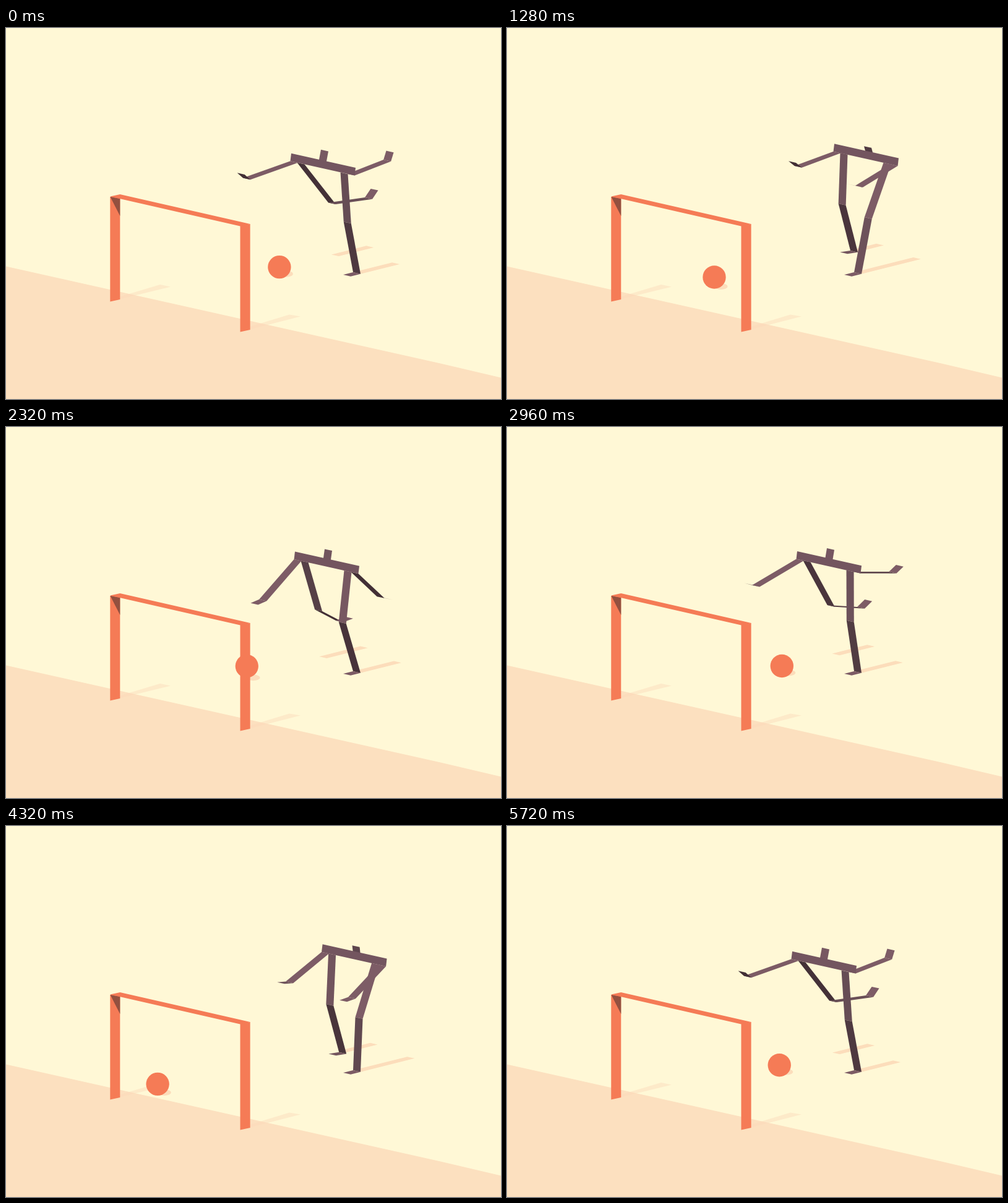
An HTML page with a canvas for the animation above (5.76 s loop, 800 by 600 pixels).

```html
<!DOCTYPE html>
<html lang="en">
<head>
<meta charset="utf-8">
<title>Off the bar</title>
<style>
html, body { margin: 0; width: 100%; height: 100%; overflow: hidden; background: #fff8d6; }
canvas { display: block; }
</style>
</head>
<body>
<canvas id="stage" width="800" height="600"></canvas>
<script>
const g = document.getElementById('stage').getContext('2d');
const CYCLE = 2880, STEP = 40, SLOPE = 0.224;
const SAND = '#fce0bf', ORANGE = '#f57b56', SHADE = '#fcddbb';
const LIGHT = [125, 92, 102], MID = [101, 76, 84], DARK = [66, 47, 53];

// Pose: torso x, head lift, left arm, right arm, left thigh (degrees), left ankle x y, right knee bend
const windup = [461, -6, 84, -98, -38, 580, 274, 5];
const swing = [469, -5, 71, -76, -28.5, 566, 291, 6];
const kick = [478, -2, 20, 5, 0, 462, 366, 14];
const hit = [484, 6, -7, 50, 27, 446, 353, 15];
const recoil = [529, 4, 83, 70, 2, 555, 360, 7];
const stand = [471, -1, 7, 6, 4, 499, 374, 22];
const stride = [467, -4, 48, -40, -16, 533, 313, 16];
const poses = [[0, windup], [80, swing], [290, kick], [880, hit], [1280, recoil],
  [1720, stand], [2120, stand], [2320, stride], [2840, windup]];

const mix = (a, b, k) => a + (b - a) * k;
const clamp = k => Math.max(0, Math.min(1, k));
const rad = deg => deg * Math.PI / 180;
const add = (p, dx, dy) => [p[0] + dx, p[1] + dy];

function poly(color, ...pts) {
  g.fillStyle = color;
  g.beginPath();
  pts.forEach(p => g.lineTo(p[0], p[1]));
  g.fill();
}

function ellipse(color, x, y, rx, ry) {
  g.fillStyle = color;
  g.beginPath();
  g.ellipse(x, y, rx, ry, 0, 0, 7);
  g.fill();
}

// Smooth periodic interpolation that rests at turning points
function poseAt(t) {
  const n = poses.length;
  const key = i => {
    const turn = Math.floor(i / n), [time, values] = poses[i - turn * n];
    return [time + turn * CYCLE, values];
  };
  let i = n - 1;
  while (poses[i][0] > t) i--;
  const [t0, a] = key(i - 1), [t1, b] = key(i), [t2, c] = key(i + 1), [t3, d] = key(i + 2);
  const slope = (p, q, r, time) => (q - p) * (r - q) > 0 ? (r - p) / time * (t2 - t1) : 0;
  const k = (t - t1) / (t2 - t1), k2 = k * k, k3 = k2 * k, ease = 3 * k2 - 2 * k3;
  return b.map((v, j) => mix(v, c[j], ease)
    + slope(a[j], v, c[j], t2 - t0) * (k3 - 2 * k2 + k)
    + slope(v, c[j], d[j], t3 - t1) * (k3 - k2));
}

// Flat strip, shaded by its slope
function strip(p, q, bias = 0, w = 12) {
  const dx = q[0] - p[0], dy = q[1] - p[1];
  const u = dx * dy / (dx * dx + dy * dy || 1) + bias;
  const to = u < 0 ? LIGHT : DARK, k = clamp(u < 0 ? -u * 4 : u * 2.3);
  const across = r => add(r, w, w * SLOPE);
  poly(`rgb(${MID.map((v, i) => mix(v, to[i], k))})`, p, q, across(q), across(p));
}

function groundShadow(x0, y0, x1) {
  const y1 = y0 - (x1 - x0) * 0.25;
  poly(SHADE, [x0, y0], [x1, y1], [x1 + 12, y1 + 2.7], [x0 + 12, y0 + 2.7]);
}

// Point reached by swinging forward from straight down in the side plane
function reach(p, deg, len) {
  const forward = len * Math.sin(rad(deg));
  return add(p, -forward, len * Math.cos(rad(deg)) + 0.25 * forward);
}

function arm(shoulder, deg, len) {
  const wrist = reach(shoulder, deg, len);
  strip(shoulder, wrist, 0.08);
  strip(wrist, reach(wrist, deg * 1.65, 14));
}

function leg(hip, knee, ankle, toe) {
  strip(hip, knee, -0.08);
  strip(knee, ankle, 0.1);
  strip(ankle, toe);
}

// The sole stays flat until the shin swings back, then the toe points
function toeOf(knee, ankle) {
  const shin = Math.atan2(knee[0] - ankle[0], ankle[1] - knee[1]);
  const foot = shin + rad(mix(96, -48, clamp((-shin - rad(20)) / rad(38))));
  return add(ankle, -17 * Math.sin(foot), 17 * Math.cos(foot));
}

function player(t) {
  const [x, lift, armL, armR, thigh, ax, ay, bend] = poseAt(t);
  const top = [x, 200.5 - 0.23 * (x - 471)], base = add(top, -1.5, 12.5);
  const joint = d => add(base, d, d * SLOPE);

  const hipL = joint(11), hipR = joint(81), ankleL = [ax, ay], ankleR = [561, 395];
  const kneeL = add(hipL, -82 * Math.sin(rad(thigh)), 82 * Math.cos(rad(thigh)));
  const kneeR = [mix(hipR[0], ankleR[0], 0.5) - bend, mix(hipR[1], ankleR[1], 0.5) + bend * 0.24 - 2];

  const groundY = at => 372 - 0.245 * (at - 503);
  const shadowX = ax - Math.max(0, groundY(ax) - ay - 25);
  groundShadow(shadowX, groundY(shadowX), shadowX / 2 + 319.5);
  groundShadow(...ankleR, 627 + 0.48 * (x - 467));

  arm(base, armL, 75 - 0.2 * (x - 471));
  strip(add(top, 48 + lift * 0.6, 13), add(top, 48, lift));
  leg(hipL, kneeL, ankleL, toeOf(kneeL, ankleL));
  leg(hipR, kneeR, ankleR, [545, 399]);
  arm(joint(92), armR, 59 + 11 * Math.cos(rad(armR)) ** 2);
  strip(top, base, -0.03, 104);
}

// Ball x, y and the height of its shadow on the stage
function ballAt(t) {
  if (t < 500) { // shot
    const k = (t - 300) / 200;
    return [mix(446, 265, k), mix(386, 274, k) - 40 * k * (1 - k), mix(397, 440, k)];
  }
  if (t < 750) { // off the bar
    const k = (t - 500) / 250, d = t - 600;
    return [mix(265, 535, k), 176 + d * d * (d < 0 ? 0.0098 : 0.0019), mix(440, 369, k)];
  }
  if (t < 880) { // against the head
    const k = (t - 750) / 130;
    return [mix(535, 527, k), mix(219, 216, k), 369.5];
  }
  if (t < 1280) { // falling back
    const d = t - 880;
    return [527 - 0.34 * d - 0.00035 * d * d, 216 - 0.33 * d + 0.00199 * d * d, mix(370, 418, d / 400)];
  }
  if (t < 1514) { // rolling to the post
    const k = (t - 1280) / 234;
    return [mix(335, 203.5, k), mix(403, 424, k), mix(418, 437, k)];
  }
  // slowing down on the way back, with one hop
  const left = 3070 - t, hop = Math.max(0, 10 - ((t - 2180) / 90) ** 2);
  const ground = Math.min(437, 397.5 + 1.87e-8 * left ** 3);
  return [445.5 - 0.0001 * left * left, ground - 11 - hop, ground];
}

function goal(t) {
  const w = -10 * Math.sin(clamp((t - 500) / 220) * Math.PI);
  poly(ORANGE, [168.3 + w, 273], [184.3 + w, 272], [184.3, 439], [168.3, 442.5]);
  poly('#93503f', [168.5 + w, 273], [184.3 + w, 276], [184.3 + w * 0.85, 304]);
  poly(ORANGE, [378.5 + w, 319], [394.6 + w, 317], [394.6, 488], [378.5, 491.5]);
  poly(ORANGE, [168.3 + w, 272.5], [184.3 + w, 269], [394.6 + w, 317], [378.5 + w, 320.5]);
}

function draw(t) {
  g.fillStyle = '#fff8d6';
  g.fillRect(0, 0, 800, 600);
  poly(SAND, [0, 385.5], [700, 542], [800, 565.5], [800, 600], [0, 600]);
  const soft = 'rgba(250,216,184,.45)';
  poly(soft, [184, 434.5], [249, 415], [266, 418.5], [184, 438.5]);
  poly(soft, [394, 483], [458, 463.5], [476, 466.5], [394, 487.5]);

  const [x, y, ground] = ballAt(t < 300 ? t + CYCLE : t);
  const high = clamp((ground - y - 11) / 150);
  ellipse(SHADE, x + 11 - 9 * high, ground, 11 - 6 * high, 5 - 2.5 * high);
  player(t);
  goal(t);
  ellipse(ORANGE, x, y, mix(18.7, 17.6, high), 18.7);
}

const start = performance.now();
function tick() {
  const t = Math.max(0, performance.now() - start);
  draw(Math.floor(t / STEP) * STEP % CYCLE);
  requestAnimationFrame(tick);
}
tick();
</script>
</body>
</html>
```
